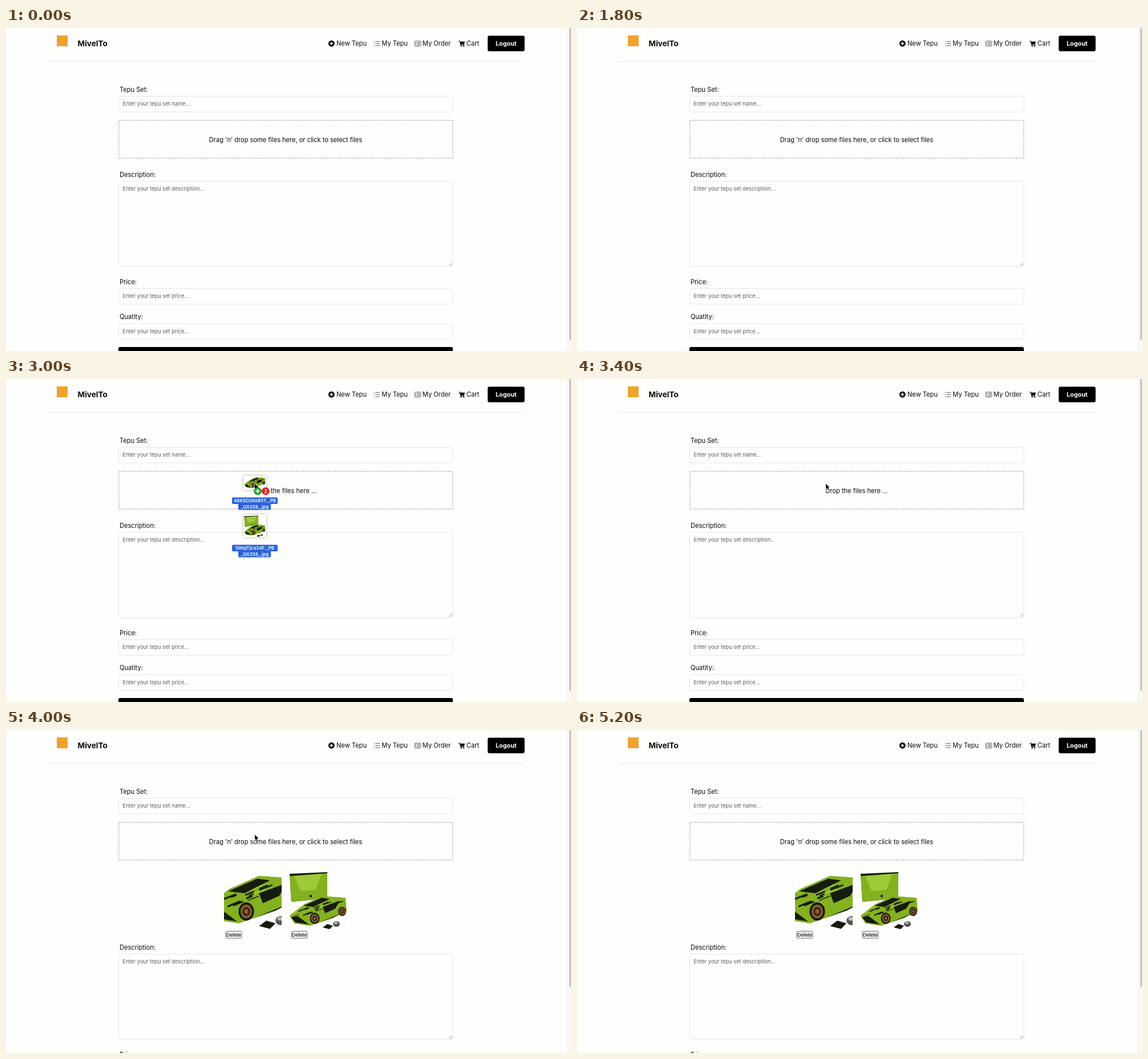
An HTML page with a canvas for the animation above (5400 ms loop, 990 by 566 pixels).

```html
<!DOCTYPE html>
<html lang="en">
<head>
<meta charset="utf-8">
<title>New set form</title>
<style>
html, body { margin: 0; width: 100%; height: 100%; overflow: hidden; background: #fefefd; }
canvas { display: block; width: 990px; height: 566px; }
</style>
</head>
<body>
<canvas id="stage" width="990" height="566"></canvas>
<script>
const ctx = document.getElementById('stage').getContext('2d');
const LOOP = 5400, STEP = 200;
const SANS = 'Inter, "Open Sans", sans-serif';
const INK = '#0b0b0b', PAPER = '#fefefd';
const GREEN = '#83b11f', LIGHT = '#9cca38', DARK = '#171b0e', BRONZE = '#8f5c2c';

function text(str, x, y, size = 11.1, color = INK, weight = 400, align = 'left', family = SANS) {
  ctx.font = `${weight} ${size}px ${family}`;
  ctx.textAlign = align;
  ctx.fillStyle = color;
  ctx.fillText(str, x, y);
}

function rect(x, y, w, h, r, fill, stroke) {
  ctx.beginPath();
  ctx.roundRect(x, y, w, h, r);
  if (fill) { ctx.fillStyle = fill; ctx.fill(); }
  if (stroke) { ctx.strokeStyle = stroke; ctx.lineWidth = 1; ctx.stroke(); }
}

function oval(x, y, rx, ry, fill) {
  ctx.beginPath();
  ctx.ellipse(x, y, rx, ry, 0, 0, Math.PI * 2);
  ctx.fillStyle = fill;
  ctx.fill();
}

function trace(...p) {
  ctx.beginPath();
  for (let i = 0; i < p.length; i += 2) ctx.lineTo(p[i], p[i + 1]);
}

function poly(fill, ...p) {
  trace(...p);
  ctx.closePath();
  ctx.fillStyle = fill;
  ctx.fill();
}

function line(color, width, ...p) {
  trace(...p);
  ctx.strokeStyle = color;
  ctx.lineWidth = width;
  ctx.stroke();
}

function at(x, y, scale, draw) {
  ctx.save();
  ctx.translate(x, y);
  ctx.scale(scale, scale);
  draw();
  ctx.restore();
}

function seeded(seed) {
  return () => (seed = (seed * 16807) % 2147483647) / 2147483647;
}

function plus(x, y, r, fill, width) {
  const arm = r * .55;
  oval(x, y, r, r, fill);
  line('#fff', width, x - arm, y, x + arm, y);
  line('#fff', width, x, y - arm, x, y + arm);
}

function bullets(x, y, gap, len) {
  for (let i = 0; i < 3; i++) {
    const row = y + i * gap;
    line('#444', 1, x, row, x + 1.4, row);
    line('#444', .9, x + 2.8, row, x + len, row);
  }
}

function cartIcon() {
  line(INK, 1.2, 0, 0, 2.2, 0, 3.6, 6.2, 10, 6.2);
  poly(INK, 2.4, .8, 11, .8, 9.8, 5.2, 3.4, 5.2);
  for (const x of [4.6, 9]) oval(x, 8.2, 1.2, 1.2, INK);
}

function header() {
  rect(89, 13, 19, 19, 0, '#f0a22f');
  text('MivelTo', 125.5, 32, 13.6, INK, 700);
  plus(570.3, 27.2, 5.5, INK, 1.5);
  text('New Tepu', 579, 31.2);
  bullets(645, 23.6, 3.7, 10);
  text('My Tepu', 658.3, 31.2);
  rect(716.3, 23, 10.4, 8.6, 1, null, '#555');
  bullets(717.8, 25.3, 2, 7.2);
  text('My Order', 729.8, 31.2);
  at(793, 23, 1, cartIcon);
  text('Cart', 806.8, 31.2);
  rect(844, 13.6, 64.7, 27.2, 3, '#000');
  text('Logout', 876.4, 31.2, 10.8, '#fff', 700, 'center');
  line('#e6e6e6', 1, 72, 58.5, 909, 58.5);
}

function field(label, hint, y, h) {
  text(label, 199, y - 7.3);
  rect(197.5, y + .5, 585.5, h, 3, PAPER, '#e5e5e5');
  text(hint, 204.3, y + 17.4, 9.3, '#5e5e5e');
}

function dropZone(active) {
  ctx.save();
  ctx.setLineDash([2.8, 1.5]);
  ctx.lineWidth = 1.4;
  ctx.strokeStyle = '#bfbfbf';
  ctx.strokeRect(197.7, 161.8, 585, 66.2);
  ctx.restore();
  const msg = active ? 'Drop the files here ...'
    : "Drag 'n' drop some files here, or click to select files";
  text(msg, 490, 200, 11.05, INK, 400, 'center');
}

function lowerForm() {
  field('Description:', 'Enter your tepu set description...', 268, 149.5);
  for (const d of [2, 5]) line('#777', .8, 781.5 - d, 416.5, 781.5, 416.5 - d);
  field('Price:', 'Enter your tepu set price...', 456, 27.5);
  field('Quatity:', 'Enter your tepu set price...', 517.5, 27.5);
  rect(197, 559, 586, 28, 3, '#000');
}

function scrollbar(h) {
  rect(984, 0, 6, 566, 0, '#fafafa');
  line('#e8e8e8', 1, 984.5, 0, 984.5, 566);
  rect(987, -4, 6, h + 4, 3, '#c1c1c1');
}

function wheel(x, y, r) {
  const rings = [DARK, BRONZE, '#39291a', BRONZE];
  rings.forEach((color, i) => oval(x, y, r * (1 - i * .25) * .85, r * (1 - i * .25), color));
}

function car() {
  ctx.save();
  poly(GREEN, 0, 76, 26, 56, 58, 42, 98, 45, 100, 68, 76, 80, 36, 94, 8, 90);
  ctx.clip();
  // Panel gaps and highlights run along the slope of the body.
  const rnd = seeded(29);
  for (let i = 0; i < 42; i++) {
    const x = rnd() * 95, y = 92 - x * .4 - rnd() * 34, len = 5 + rnd() * 13;
    line(i % 3 ? DARK : LIGHT, .7 + rnd() * 1.4, x, y, x + len, y - len * .4);
  }
  poly(DARK, 24, 59, 56, 45, 70, 47, 42, 61);
  poly(DARK, 58, 61, 88, 50, 80, 64, 62, 72);
  poly(DARK, 2, 79, 14, 77, 34, 92, 10, 88);
  line(DARK, 3, 50, 91, 100, 70);
  ctx.restore();
  wheel(44, 81, 10);
  wheel(92, 69, 8);
}

function parts() {
  poly(DARK, 58, 97, 66, 91, 76, 94, 70, 100);
  oval(82, 91, 6, 5, '#555');
  oval(81, 89, 3, 2, '#bbb');
}

function boxPhoto() {
  poly(DARK, 0, 3, 66, 0, 66, 46, 3, 52);
  poly(GREEN, 0, 7, 66, 2, 66, 46, 3, 52);
  poly(LIGHT, 8, 7, 56, 3, 45, 31, 19, 33);
  oval(37, 42, 2.2, 2.2, DARK);
  car();
  parts();
}

function closePhoto() {
  ctx.beginPath();
  ctx.rect(0, 0, 101, 101);
  ctx.clip();
  at(-31.4, -60.6, 1.6, () => { car(); parts(); });
}

function previews() {
  [closePhoto, boxPhoto].forEach((photo, i) => at(382 + i * 115, 249, 1, () => {
    photo();
  }));
  for (const x of [399, 514]) {
    rect(x - 14, 352.5, 28, 12.5, 1.5, '#efefef', '#777');
    text('Delete', x, 362, 9.1, '#000', 400, 'center', '"Liberation Sans", Arial, sans-serif');
  }
}

function dragItem(y, h, photo, photoY, name) {
  ctx.save();
  ctx.shadowColor = 'rgba(0,0,0,.35)';
  ctx.shadowBlur = 4;
  rect(-20, y, 40, h, 1, '#fff');
  ctx.restore();
  at(-18.5, photoY, .37, photo);
  const top = y + h + 13;
  rect(-40, top, 80, 11.5, 2, '#2c62dc');
  rect(-29, top + 10, 57, 12, 2, '#2c62dc');
  text(name, 0, top + 8.8, 8, '#fff', 600, 'center');
  text('_QX258_.jpg', 0, top + 19.6, 8, '#fff', 600, 'center');
}

function badges() {
  plus(5, 13, 6.8, '#259b33', 2);
  oval(19, 13, 6.8, 6.8, '#e0261f');
  text('2', 19, 16.2, 9, '#fff', 500, 'center');
}

function pointer(dragging) {
  if (dragging) {
    dragItem(-14, 25, car, -27, '46K8D2KeR5T._PB');
    dragItem(54, 40, boxPhoto, 56, '59hpTjca34F._PB');
  }
  trace(0, 0, 0, 9.2, 2.1, 7.3, 3.7, 11, 5.3, 10.3, 3.7, 6.7, 6.5, 6.5);
  ctx.closePath();
  ctx.lineJoin = 'round';
  ctx.strokeStyle = '#fff';
  ctx.lineWidth = 1.2;
  ctx.stroke();
  ctx.fillStyle = '#000';
  ctx.fill();
  if (dragging) badges();
}

function draw(t) {
  const loaded = t >= 3600;
  const over = t >= 2800 && !loaded;
  ctx.fillStyle = PAPER;
  ctx.fillRect(0, 0, 990, 566);
  header();
  field('Tepu Set:', 'Enter your tepu set name...', 119, 27.5);
  dropZone(over);
  if (loaded) previews();
  at(0, loaded ? 124 : 0, 1, lowerForm);
  scrollbar(loaded ? 451 : 547);
  if (t >= 2400) {
    // Glide to the drop point, rest there, then leave through the top.
    const u = Math.min(1, (t - 2600) / 400);
    const rise = Math.max(0, t - 4600) * .45;
    at(315 + 121 * u, 193 - 9.5 * u - rise, 1, () => pointer(over && t < 3400));
  }
}

const start = performance.now();
function tick() {
  const t = (performance.now() - start) % LOOP;
  draw(Math.floor(t / STEP) * STEP);
  requestAnimationFrame(tick);
}
tick();
</script>
</body>
</html>
```
